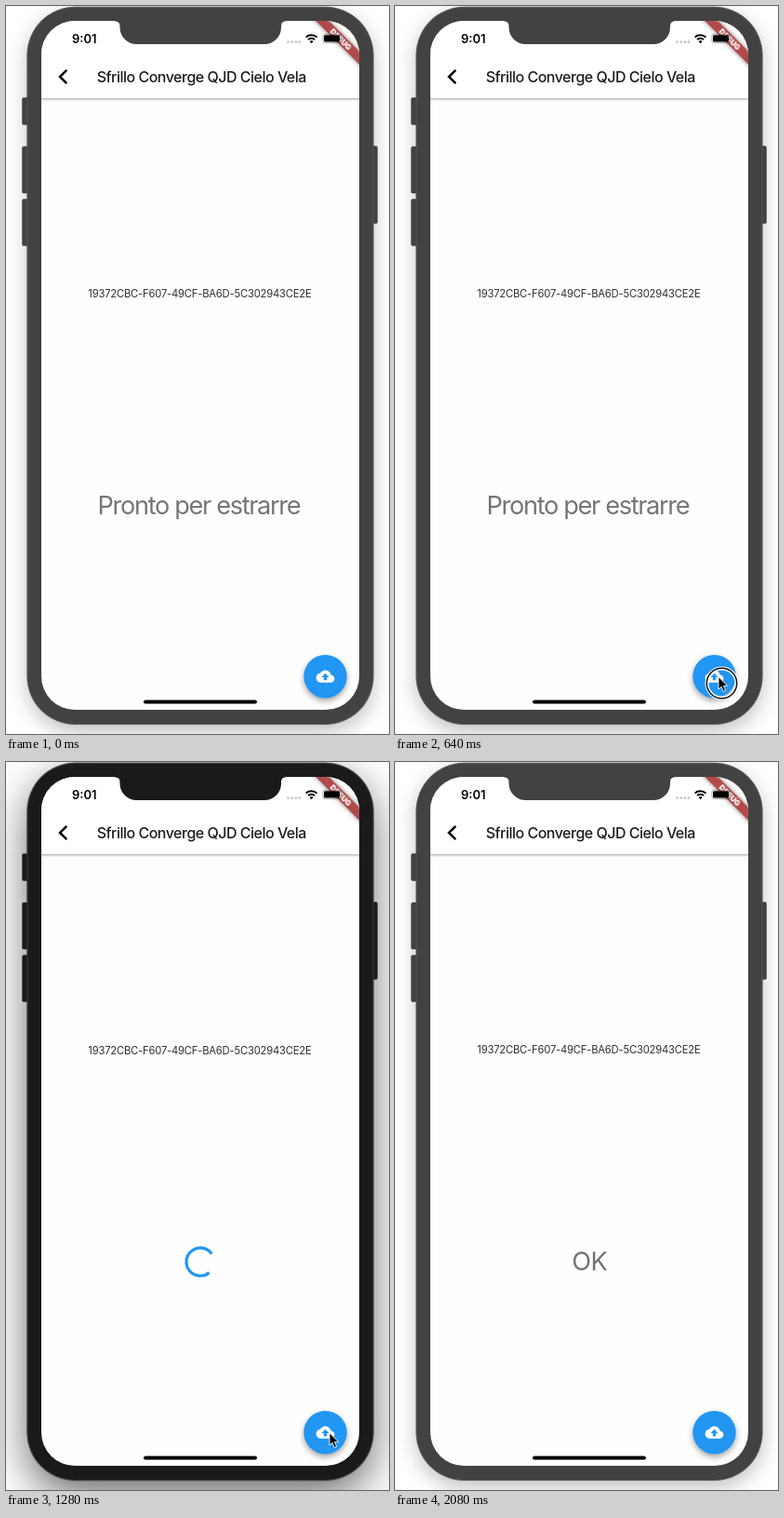
An HTML page for the animation above (2.24 s loop, 412 px wide and 782 px high).

```html
<!DOCTYPE html>
<html lang="it">
<head>
<meta charset="utf-8">
<title>Estrazione</title>
<style>
  html, body { margin: 0; width: 100%; height: 100%; overflow: hidden; background: #fff; }
  body { position: relative; }
  svg { position: absolute; left: 0; top: 0; display: block; }
  text { font-family: Inter, "Open Sans", sans-serif; font-optical-sizing: none; }

  /* every animated part holds its pose, then jumps */
  .glow, .frame, .ready, .ok, .spin, .id, .ring, .cursor {
    animation: 2240ms step-end infinite;
  }

  .glow {
    position: absolute; left: 23px; top: 1px; width: 372px; height: 771px;
    border-radius: 52px; animation-name: glow;
  }
  .frame { color: #424242; animation-name: frame; }
  .ready { animation-name: ready; }
  .ok { animation-name: ok; }
  .spin { animation-name: spin; }
  .id { animation-name: id; }
  .ring { animation-name: ring; }
  .cursor { animation-name: cursor; }

  .title { font-size: 16px; font-weight: 500; letter-spacing: -.5px; fill: #1c1c1c; }
  .id { font-size: 11.25px; letter-spacing: -.22px; fill: #303030; }
  .state { font-size: 27.2px; fill: #757575; }
  .ready { letter-spacing: -1.35px; }
  .ok { letter-spacing: -.5px; }
  .clock { font-size: 13px; font-weight: 600; }
  .debug { font-size: 8.2px; font-weight: 900; fill: #fff; }
  .mid { text-anchor: middle; }
  .bar { filter: drop-shadow(0 1px 1.5px rgba(0, 0, 0, .38)); }
  .fab { filter: drop-shadow(0 3px 3px rgba(0, 0, 0, .36)); }
  .ribbon { filter: drop-shadow(0 0 2.5px rgba(0, 0, 0, .5)); }

  @keyframes glow {
    0%, 92.8571% { box-shadow: 0 7px 22px rgba(0, 0, 0, .26); }
    35.7143% { box-shadow: 0 16px 46px rgba(0, 0, 0, .58), 0 0 2px rgba(0, 0, 0, .4); }
  }
  @keyframes frame {
    0%, 92.8571% { color: #424242; }
    35.7143% { color: #1a1a1a; }
  }
  @keyframes ready {
    0% { visibility: visible; }
    57.1429%, 100% { visibility: hidden; }
  }
  @keyframes spin {
    0%, 64.2857% { visibility: hidden; }
    57.1429% { visibility: visible; }
  }
  @keyframes ok {
    0% { visibility: hidden; }
    64.2857%, 100% { visibility: visible; }
  }
  @keyframes id {
    0%, 64.2857% { transform: none; }
    57.1429% { transform: translateY(1px); }
  }
  @keyframes ring {
    0%, 35.7143% { visibility: hidden; }
    28.5714% { visibility: visible; }
  }
  @keyframes cursor {
    0%, 78.5714% { visibility: hidden; transform: translate(391px, 755px); }
    14.2857% { visibility: visible; transform: translate(391px, 755px); }
    21.4286% { visibility: visible; transform: translate(364px, 732px); }
    28.5714% { visibility: visible; transform: translate(348px, 720px); }
    71.4286% { visibility: visible; transform: translate(348px, 731px); }
  }
</style>
</head>
<body>
<div class="glow"></div>
<svg width="412" height="782" viewBox="0 0 412 782">
  <defs>
    <clipPath id="screen"><rect x="38" y="16" width="342" height="740" rx="36"/></clipPath>
  </defs>

  <!-- phone body -->
  <g class="frame" fill="currentColor">
    <g stroke="#000" stroke-opacity=".3">
      <rect x="17.5" y="98.5" width="8" height="29" rx="1.5"/>
      <rect x="17.5" y="151" width="8" height="50" rx="1.5"/>
      <rect x="17.5" y="207.5" width="8" height="50" rx="1.5"/>
      <rect x="391.5" y="150.5" width="8" height="83" rx="1.5"/>
    </g>
    <rect x="22.5" y=".8" width="373" height="771.2" rx="52"/>
    <rect x="23" y="1.3" width="372" height="770.2" rx="51.5" fill="none" stroke="#777" stroke-opacity=".4"/>
  </g>

  <g clip-path="url(#screen)">
    <rect x="38" y="16" width="342" height="740" fill="#fefefe"/>

    <!-- app bar -->
    <rect class="bar" x="30" y="10" width="358" height="89" fill="#fff"/>
    <path d="M65.3 68.8 58 76l7.3 7.2" fill="none" stroke="#000" stroke-width="2.5"/>
    <text class="title mid" x="210.3" y="82">Sfrillo Converge QJD Cielo Vela</text>

    <!-- content -->
    <text class="id mid" x="208.4" y="313.2">19372CBC-F607-49CF-BA6D-5C302943CE2E</text>
    <text class="state ready mid" x="207.4" y="546">Pronto per estrarre</text>
    <text class="state ok mid" x="209.2" y="546">OK</text>
    <path class="spin" d="M218.6 548.5A15 15 0 1 1 221.3 528.4" fill="none" stroke="#2196f3" stroke-width="3.2"/>

    <!-- upload button -->
    <circle class="fab" cx="343.5" cy="720.2" r="23.2" fill="#2196f3"/>
    <path transform="translate(333.6 710.2) scale(.826)" fill="#fff"
      d="M19.35 10.04C18.67 6.59 15.64 4 12 4 9.11 4 6.6 5.64 5.35 8.04 2.34 8.36 0 10.91 0 14c0 3.31 2.69 6 6 6h13c2.76 0 5-2.24 5-5 0-2.64-2.05-4.78-4.65-4.96zM14 13v4h-4v-4H7l5-5 5 5z"/>

    <!-- debug ribbon -->
    <g transform="translate(380 16) rotate(45)">
      <rect class="ribbon" x="-40" y="23.1" width="80" height="9.9" fill="#b34a4a"/>
      <text class="debug mid" x="0" y="31">DEBUG</text>
    </g>

    <!-- status bar -->
    <text class="clock" x="71" y="39.8">9:01</text>
    <g fill="#cbcbcb">
      <circle cx="303.5" cy="38.4" r="1.5"/>
      <circle cx="307.8" cy="38.4" r="1.5"/>
      <circle cx="312" cy="38.4" r="1.5"/>
      <circle cx="316" cy="38.4" r="1.5"/>
    </g>
    <g fill="none" stroke="#000" stroke-width="1.9">
      <path d="M322.7 33.6a8.4 8.4 0 0 1 11.8 0"/>
      <path d="M325.1 36.2a4.9 4.9 0 0 1 7 0"/>
    </g>
    <path d="M328.6 40.2l-2-2.1a2.8 2.8 0 0 1 4 0z"/>
    <rect x="340.8" y="30.1" width="19.4" height="9.6" rx="2.6" fill="none" stroke="#000" stroke-opacity=".4" stroke-width=".8"/>
    <rect x="342" y="31.3" width="17" height="7.2" rx="1.5"/>
    <path d="M361.2 33.3q1.4 1.6 0 3.2z" fill-opacity=".45"/>

    <rect x="148" y="745.4" width="122" height="4.2" rx="2.1"/>
  </g>

  <!-- notch -->
  <path class="frame" fill="currentColor"
    d="M117 15.5H301V16.2Q296 16.4 296 21.5V23A18 18 0 0 1 278 41H140.500A18 18 0 0 1 122.500 23V21.500Q122.500 16.400 117 16.200z"/>

  <!-- pointer -->
  <g class="ring" fill="none">
    <circle cx="351.500" cy="727.500" r="16" stroke="#fff" stroke-width="4"/>
    <circle cx="351.500" cy="727.500" r="16.200" stroke="#111" stroke-width="1.500"/>
  </g>
  <path class="cursor" d="M0 .5V14L3 11.200 5.200 16.300 7.600 15.300 5.400 10.300H9.600z" stroke="#fff" stroke-width=".9"/>
</svg>
</body>
</html>
```
